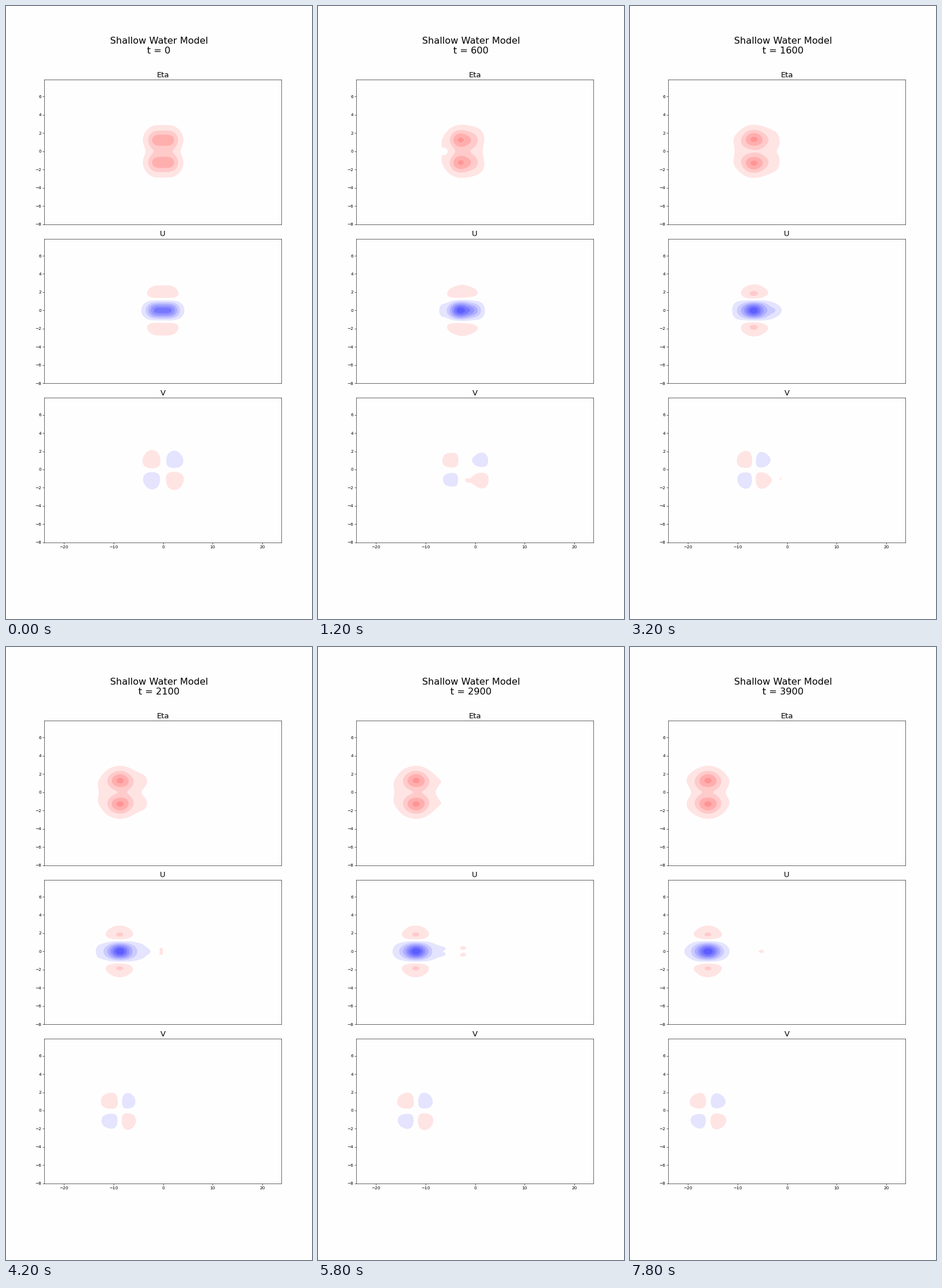
Write a matplotlib script that moves like this. It is 529x1058 px and loops after 8 s.

```python
import numpy as np
import matplotlib.pyplot as plt
from matplotlib.animation import FuncAnimation

FRAMES = 40
INTERVAL = 200      # ms
STEPS = 10          # solver steps per frame
DT = 0.1
H = 0.25            # solver grid spacing
BAND = 1 / 19       # height of one colour band
BIAS = 0.0015       # the bands sit slightly below zero

plt.rcParams["font.family"] = "DejaVu Sans"
bwr = plt.get_cmap("bwr")

x = np.arange(-24, 24, H)
y = np.arange(-8, 8, H)[:, None]


def initial_state(b=0.395):
    """Equatorial Rossby wave packet: u, v, eta."""
    phi = 0.771 * b**2 / np.cosh((b * x) ** 2) * np.exp(-y**2 / 2)
    u = phi * (6 * y**2 - 9) / 4
    v = -2 * b**2 * x * phi * 2 * y
    eta = phi * (6 * y**2 + 3) / 4
    return np.array([u, v, eta])


def diff(a, axis):
    """Fourth-order periodic derivative."""
    near = np.roll(a, -1, axis) - np.roll(a, 1, axis)
    far = np.roll(a, -2, axis) - np.roll(a, 2, axis)
    return (8 * near - far) / (12 * H)


def tendency(s):
    """Shallow water equations on the equatorial beta plane."""
    u, v, eta = s
    sx, sy = diff(s, 2), diff(s, 1)
    out = -(u * sx + v * sy)
    out[0] += y * v - sx[2]
    out[1] -= y * u + sy[2]
    out[2] -= (1 + eta) * (sx[0] + sy[1])
    return out


def step(s):
    k1 = tendency(s)
    k2 = tendency(s + DT / 2 * k1)
    k3 = tendency(s + DT / 2 * k2)
    k4 = tendency(s + DT * k3)
    return s + DT / 6 * (k1 + 2 * k2 + 2 * k3 + k4)


def refine(a, axis):
    """Double the resolution along one axis with cubic midpoints."""
    near = a + np.roll(a, -1, axis)
    far = np.roll(a, 1, axis) + np.roll(a, -2, axis)
    mid = (9 * near - far) / 16
    shape = list(a.shape)
    shape[axis] *= 2
    return np.stack([a, mid], axis + 1).reshape(shape)


def simulate():
    s = initial_state()
    states = [s]
    for _ in range(FRAMES - 1):
        for _ in range(STEPS):
            s = step(s)
        states.append(s)
    return [refine(refine(s, 1), 2) for s in states]


states = simulate()
xf = np.arange(-24, 24, H / 2)
yf = np.arange(-8, 8, H / 2)

fig, axes = plt.subplots(3, 1, figsize=(10, 20), dpi=52.9, facecolor="#fefefe")
fig.subplots_adjust(left=0.125, right=0.9, bottom=0.125, top=0.88, hspace=0.1)


def heading(text, baseline):
    return fig.text(0.5, 1 - baseline / 1058, text, size=22,
                    ha="center", va="baseline")


heading("Shallow Water Model", 65)
clock = heading("", 82)

for ax, name in zip(axes, ("Eta", "U", "V")):
    ax.set_title(name, size=18)
    ax.set_facecolor(bwr(0.5))
    ax.set_xlim(-24, xf[-1])
    ax.set_ylim(-8, yf[-1])
    ax.set_yticks(range(-8, 8, 2))
    ax.set_xticks(range(-20, 21, 10) if ax is axes[-1] else [])

# Panel, index in the state, and the staggered grid offsets of the variable
panels = [(axes[0], 2, 0, 0), (axes[1], 0, -H / 4, 0), (axes[2], 1, 0, -H / 4)]
drawn = []


def paint(ax, z, dx, dy):
    """Stack filled bands from the outermost inwards."""
    def fill(lo, hi, shade):
        drawn.append(ax.contourf(xf + dx, yf + dy, z, levels=[lo, hi],
                                 colors=[bwr(shade)], antialiased=True))

    for k in range(1, 10):
        edge = (k - 0.5) * BAND
        if z.max() > edge - BIAS:
            fill(edge - BIAS, 2, 0.5 + k / 19)
        if z.min() < -edge - BIAS:
            fill(-2, -edge - BIAS, 0.5 - k / 19)


def update(i):
    while drawn:
        drawn.pop().remove()
    for ax, var, dx, dy in panels:
        paint(ax, states[i][var], dx, dy)
    clock.set_text(f"t = {100 * i}")


anim = FuncAnimation(fig, update, frames=FRAMES, interval=INTERVAL,
                     repeat=True, repeat_delay=0)
plt.show()
```
